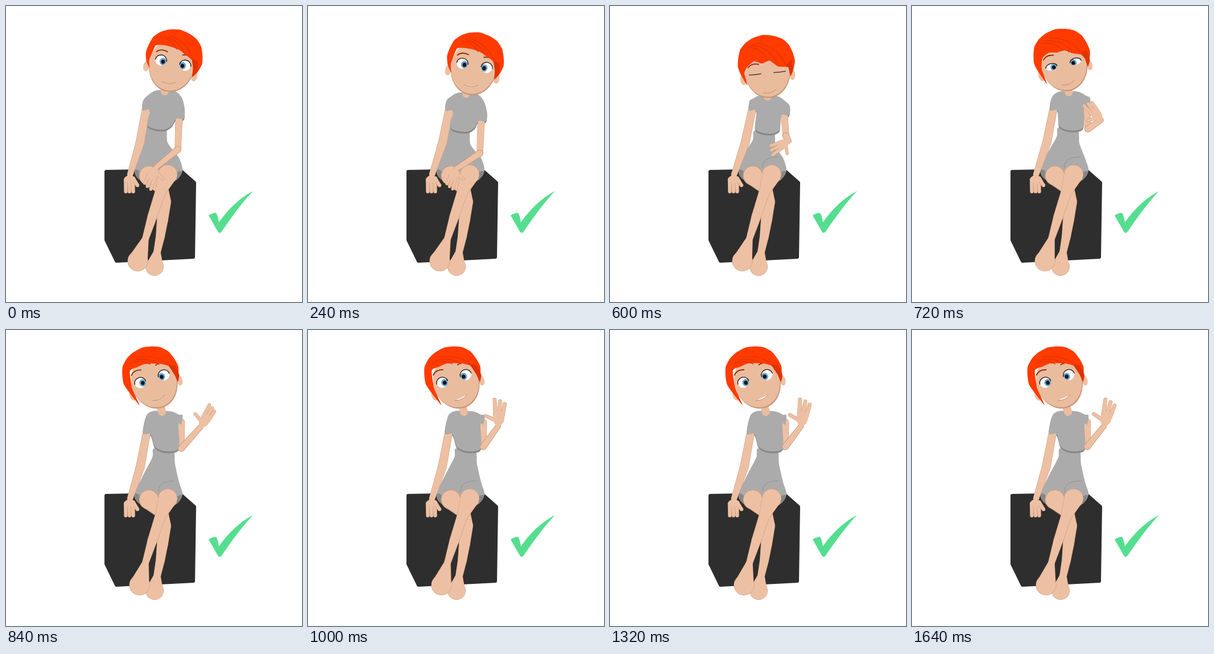
Animation of 520 by 520 pixels, one loop 1.68 s. Source, as an HTML page with a canvas:

```html
<!DOCTYPE html>
<html lang="en">
<head>
<meta charset="utf-8">
<title>Waving figure</title>
<style>
  html, body { margin: 0; width: 100%; height: 100%; overflow: hidden; background: #fff; }
  canvas { display: block; }
</style>
</head>
<body>
<canvas id="stage" width="520" height="520"></canvas>
<script>
const ctx = document.getElementById('stage').getContext('2d');
const LOOP = 1680, STEP = 40, RAD = Math.PI / 180;
const SKIN = '#edc0a3', FACE = '#eabc9e', SHADE = '#c9977a', DRESS = '#ababab',
      DRESS_DARK = '#878787', HAIR = '#ff3b00', HAIR_DARK = '#e03200', BROW = '#8f2a0c';

// head: x, y, tilt; mood: turn, nod, smile; cuff: right sleeve end x, y, width;
// hand: direction, finger spread, size.
const rest = {
  head: [291, 103.5, 12], mood: [1, .1, 1], neck: [281, 149], waist: [264, 215], sleeve: [240, 183],
  cuff: [299, 198, 13], elbow: [302, 252], wrist: [264, 283], hand: [115, 11, .85], foot: [0]
};
const dip = {
  head: [287.5, 115, 5], mood: [.5, .15, 3], neck: [279, 158], waist: [268, 223], sleeve: [244, 185],
  cuff: [300, 204, 13], elbow: [303, 260], wrist: [267, 280], hand: [115, 11, .7], foot: [0]
};
const blink = {
  head: [276, 114, -6], mood: [0, 1, 1], neck: [279, 158], waist: [271, 222], sleeve: [244, 184],
  cuff: [301, 192, 13], elbow: [309, 228], wrist: [314, 237], hand: [152, 13, .8], foot: [1]
};
const rise = {
  head: [260, 91, -18], mood: [-1, -.1, 2], neck: [276, 143], waist: [277, 211], sleeve: [241, 183],
  cuff: [303, 166, 5], elbow: [308, 208], wrist: [342, 170], hand: [302, 10, .88], foot: [3]
};
const greet = { ...rise, mood: [-1, -.15, 5], elbow: [308, 205], wrist: [335.5, 169], hand: [280, 12, 1] };
const settled = { ...greet, head: [258.5, 91, -18], foot: [4] };
const KEYS = [[0, rest], [440, dip], [600, blink], [840, rise], [1000, greet], [1320, settled], [LOOP, settled]];

const clamp = v => Math.max(0, Math.min(1, v));
const lidAt = t => clamp(Math.max((560 - t) / 90, (t - 650) / 110));

// Cubic blend through the key poses, then the swing of the waving hand.
function poseAt(t) {
  const k = KEYS.findIndex(key => key[0] > t) - 1;
  const [t0, a] = KEYS[k], [t1, b] = KEYS[k + 1], span = t1 - t0, u = (t - t0) / span;
  const slope = (i, f, n) => i === 0 || i === KEYS.length - 1 ? 0 :
    (KEYS[i + 1][1][f][n] - KEYS[i - 1][1][f][n]) / (KEYS[i + 1][0] - KEYS[i - 1][0]);
  const pose = {};
  for (const f in a) pose[f] = a[f].map((v, n) => v + (b[f][n] - v) * u * u * (3 - 2 * u) +
    span * u * (1 - u) * ((1 - u) * slope(k, f, n) - u * slope(k + 1, f, n)));
  const swing = -Math.sin((t - 1320) / 426.7 * 2 * Math.PI) * clamp((t - 840) / 160);
  pose.hand[0] += 5.5 * swing;
  pose.wrist[0] += 1.5 * swing;
  return pose;
}

// Closed curve through the points; k sets how round it is.
function blob(p, fill, k = .14) {
  const n = p.length, at = i => p[(i + n) % n];
  ctx.beginPath();
  ctx.moveTo(...p[0]);
  for (let i = 0; i < n; i++) {
    const [a, b, c, d] = [at(i - 1), at(i), at(i + 1), at(i + 2)];
    ctx.bezierCurveTo(b[0] + (c[0] - a[0]) * k, b[1] + (c[1] - a[1]) * k,
                      c[0] - (d[0] - b[0]) * k, c[1] - (d[1] - b[1]) * k, ...c);
  }
  ctx.fillStyle = fill;
  ctx.fill();
}

function oval(x, y, rx, ry, fill, deg = 0) {
  ctx.beginPath();
  ctx.ellipse(x, y, rx, ry, deg * RAD, 0, 7);
  ctx.fillStyle = fill;
  ctx.fill();
}

function arc(x0, y0, cx, cy, x1, y1, color, width) {
  ctx.beginPath();
  ctx.moveTo(x0, y0);
  ctx.quadraticCurveTo(cx, cy, x1, y1);
  ctx.strokeStyle = color;
  ctx.lineWidth = width;
  ctx.stroke();
}

// Tapered limb through joints [x, y, radius], with a thin shaded rim.
function limb(joints, rim = .5) {
  for (const [grow, fill] of [[rim, SHADE], [0, SKIN]]) {
    joints.forEach(([x, y, r], i) => {
      oval(x, y, r + grow, r + grow, fill);
      if (!i) return;
      const [px, py, pr] = joints[i - 1], a = Math.atan2(y - py, x - px);
      const s = Math.sin(a), c = Math.cos(a), r0 = pr + grow, r1 = r + grow;
      ctx.beginPath();
      ctx.moveTo(px - s * r0, py + c * r0);
      ctx.lineTo(x - s * r1, y + c * r1);
      ctx.lineTo(x + s * r1, y - c * r1);
      ctx.lineTo(px + s * r0, py - c * r0);
      ctx.fill();
    });
  }
}

function drawSet() {
  ctx.beginPath();
  [[176, 291], [306, 288.5], [331, 310.5], [329, 441], [194, 448], [176, 411]]
    .forEach(p => ctx.lineTo(...p));
  ctx.closePath();
  ctx.fillStyle = ctx.strokeStyle = '#2e2e2e';
  ctx.lineWidth = 6;
  ctx.fill();
  ctx.stroke();

  ctx.beginPath();
  ctx.moveTo(356, 368);
  ctx.quadraticCurveTo(363, 363, 369, 363.5);
  ctx.quadraticCurveTo(372, 367, 374, 380);
  ctx.quadraticCurveTo(400, 343, 434, 325);
  ctx.quadraticCurveTo(411, 349, 379, 396);
  ctx.quadraticCurveTo(375, 401, 372, 396);
  ctx.fillStyle = '#55de8f';
  ctx.fill();
}

function drawSkirt({ waist: [x, y] }) {
  const hem = 226;
  blob([[x - 17, y - 3], [x - 20, y + 13], [hem + (x - 20 - hem) * .4, 260], [hem, 288], [231, 302],
        [250, 311], [290, 310], [305, 300], [310, 287], [304, 267], [x + 20, y + 25], [x + 16, y - 3]], DRESS);
  blob([[hem, 288], [234, 290], [240, 308], [230, 301]], DRESS_DARK);
  blob([[309, 291], [301, 292], [291, 309], [304, 301]], DRESS_DARK);
  arc(268, 284, 267, 265, 296, 265, '#8d8d8d', .8);
}

function drawLegs({ foot: [shift] }) {
  limb([[251, 298, 16.5], [270, 321, 8]], 1);
  limb([[276, 322, 9], [279, 344, 10.5], [275, 375, 9.5], [271, 405, 7.5], [265.5, 432, 6], [261, 458, 15.5]]);
  limb([[284, 296, 16.5], [271, 327, 9], [257, 370, 8], [245, 409, 5.5], [231.5 + shift, 448, 17.5]]);
}

function drawPropArm({ sleeve: [x, y] }) {
  limb([[x + 6.5, y - 5, 6.5], [235.5 + (x - 240) / 2, 240, 7.3], [218, 296, 4.8]]);
  for (let i = 0; i < 3; i++) limb([[210.5 + i * 6.2, 305, 3.2], [210.5 + i * 6.5, 326, 2.7]]);
  limb([[223, 303, 3.5], [231, 315, 2.8]]);
  oval(217, 304, 9, 6.5, SKIN);
}

function torsoPoints({ neck: [nx, ny], waist: [wx, wy], sleeve: [lx, ly], cuff: [cx, cy, w] }) {
  return [[nx - 15, ny - 1], [nx - 28, ny + 5], [lx + 1, ly - 17], [lx, ly], [lx + 13, ly],
          [wx - 16, wy - 7], [wx - 3, wy + 1], [wx + 15, wy + 2], [wx + 27, wy - 5], [cx, cy], [cx + w, cy],
          [cx + w + 2, cy - 16], [nx + 28, ny + (cy - ny) * .25], [nx + 14, ny]];
}

function drawForearm({ elbow, wrist: [wx, wy], hand: [deg, spread, size] }) {
  const polar = (d, r) => [wx + Math.cos(d * RAD) * r * size, wy + Math.sin(d * RAD) * r * size];
  limb([[...elbow, 5.2], [wx, wy, 4]], .9);
  limb([[...polar(deg - 30, 12), 3.2 * size], [...polar(deg - 55, 28), 2.6 * size]]);
  for (let i = -1; i < 2; i++)
    limb([[...polar(deg + i * 18, 20), 3.5 * size], [...polar(deg + i * spread, 44 - 3 * i), 2.8 * size]]);
  oval(...polar(deg, 14), 13 * size, 10 * size, SKIN, deg);
}

function drawEye(x, y, look, open) {
  if (open < .12) return arc(x - 10.5, y, x, y + 1, x + 10.5, y, '#3a2015', 1.2);
  ctx.save();
  ctx.beginPath();
  ctx.ellipse(x, y, 10, 9.3 * open, 0, 0, 7);
  ctx.fillStyle = '#fff';
  ctx.fill();
  ctx.clip();
  oval(x + look, y + 1.5, 6, 6.5, '#6ca3ca');
  oval(x + look, y + 1.8, 3.3, 3.6, '#10161c');
  ctx.restore();
  ctx.beginPath();
  ctx.ellipse(x, y, 10, 9.3 * open, 0, Math.PI, Math.PI * 2);
  ctx.strokeStyle = '#20130e';
  ctx.lineWidth = 1.3;
  ctx.stroke();
}

function drawHair(turn, nod) {
  const crown = [], fringe = [];
  for (let i = 0; i <= 12; i++) {
    const a = (157 + i * 18.8) * RAD, c = Math.cos(a), wave = 1 + .012 * Math.sin(i * 2.4);
    crown.push([1.5 * turn + 50 * Math.sign(c) * Math.abs(c) ** .9 * wave, -16 + 47 * Math.sin(a) * wave]);
  }
  for (let i = 0; i < 6; i++) {
    const x = 33 - i * 13.5;
    fringe.push([x, -33 + .008 * (x + 12) ** 2 + nod * (13 + i % 2 * 6)]);
  }
  blob([[-37, 22 - 9 * turn], ...crown, [40, 13], [38, -2], ...fringe, [-40, 0]], HAIR, .1);
  blob([[33, -19 + nod * 14], [44, -15], [46, 2], [40, 13], [38, -2]], HAIR_DARK, .06);
  for (let i = 0; i < 3; i++)
    arc(33 - i * 15, -20 - i * 5 + nod * 12, 20 - i * 14, -44, -14 - i * 8, -50 + i * 3, HAIR_DARK, 1.2);
}

function drawHead({ head: [x, y, tilt], mood: [turn, nod, smile], neck: [nx, ny] }, open) {
  ctx.beginPath();
  ctx.moveTo(x, y);
  ctx.lineTo(nx - 2, ny + 1);
  ctx.strokeStyle = FACE;
  ctx.lineWidth = 14;
  ctx.stroke();

  ctx.save();
  ctx.translate(x, y);
  ctx.rotate(tilt * RAD);
  for (const side of [-1, 1]) oval(side * 43, 11, 5.5, 9.5, SKIN);
  oval(.5, .8, 40, 47, SHADE);
  oval(0, -.8, 39.5, 46.2, FACE);

  const eyeY = -5 + 9 * nod;
  for (const side of [-1, 1]) {
    const ex = turn * 1.7 + side * 21.7, by = eyeY - 15 + (turn < 0 ? turn * 4 : 0);
    drawEye(ex, eyeY, side < 0 ? 4 : -4.5, open);
    arc(ex + side * 11, by + 2, ex + side * 4, by - 6, ex - side * 8, by - 2, BROW, 1.8);
  }

  ctx.translate(turn, 31 + 6 * nod);
  ctx.rotate(-8 * RAD);
  ctx.beginPath();
  ctx.moveTo(-11, -1);
  ctx.quadraticCurveTo(1, 5, 12, -1);
  ctx.quadraticCurveTo(1, 5 - smile, -11, -1);
  ctx.fillStyle = '#fff';
  ctx.fill();
  arc(-11, -1, 1, 5, 12, -1, '#b9795b', .8);
  ctx.rotate(8 * RAD);
  ctx.translate(-turn, -31 - 6 * nod);
  drawHair(turn, nod);
  ctx.restore();
}

function draw(now) {
  const t = Math.floor(now % LOOP / STEP) * STEP, pose = poseAt(t);
  const torso = torsoPoints(pose), [cx, cy] = pose.cuff;
  ctx.fillStyle = '#fff';
  ctx.fillRect(0, 0, 520, 520);
  ctx.lineCap = ctx.lineJoin = 'round';
  drawSet();
  drawSkirt(pose);
  drawLegs(pose);
  blob(torso.map(([x, y]) => [x, y + 3]), DRESS_DARK);
  drawPropArm(pose);
  limb([[cx + 5, cy - 4, 5.8], [...pose.elbow, 5.2]]);
  blob(torso, DRESS);
  drawHead(pose, lidAt(t));
  drawForearm(pose);
  requestAnimationFrame(draw);
}
requestAnimationFrame(draw);
</script>
</body>
</html>
```
